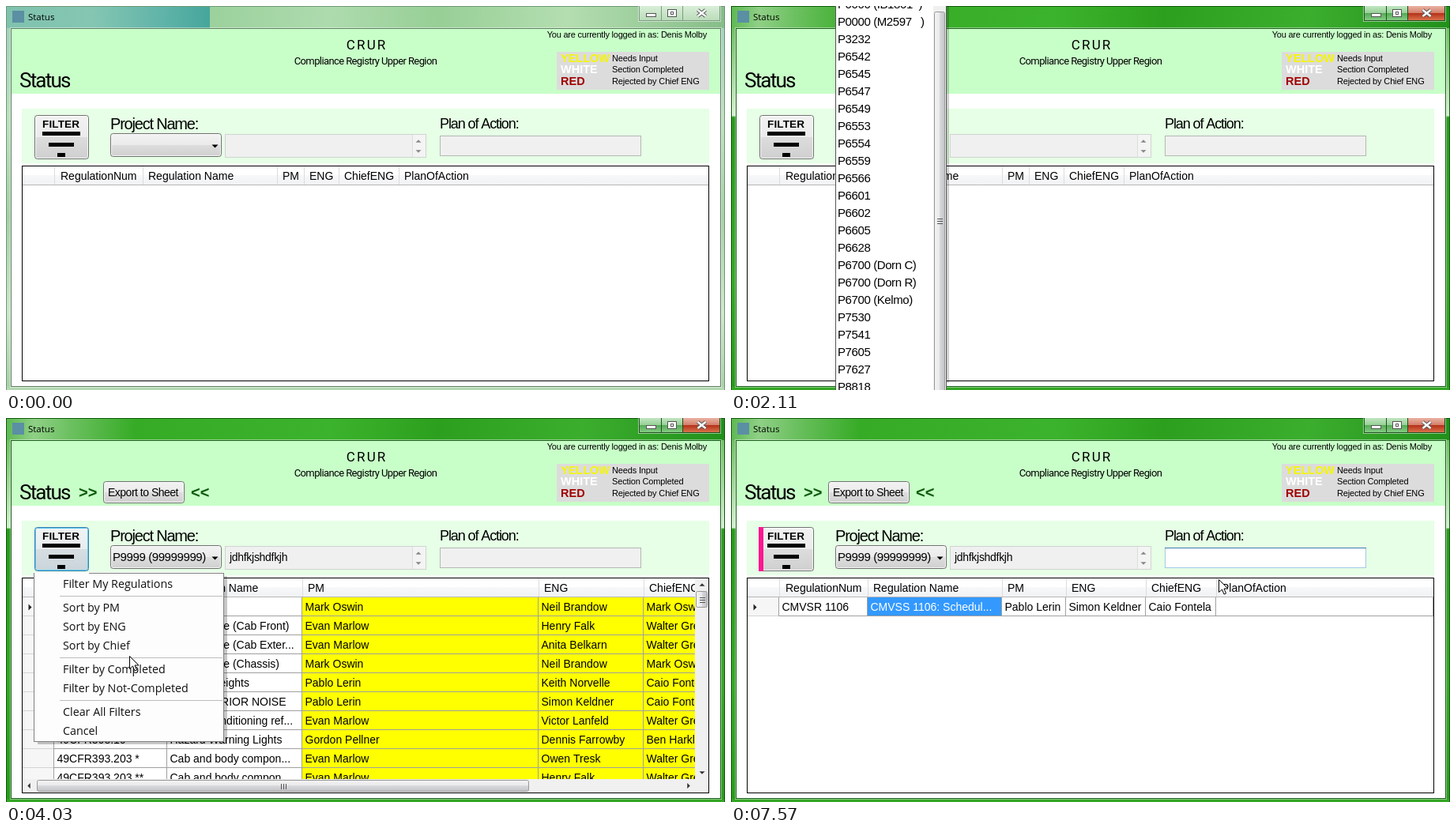
Write an HTML page with a canvas that moves like this. It is 910 px wide and 486 px high and loops after 8000 ms.

```html
<!DOCTYPE html>
<html lang="en">
<head>
<meta charset="utf-8">
<title>Status</title>
<style>
  html, body { margin: 0; width: 100%; height: 100%; overflow: hidden; }
  canvas { display: block; }
</style>
</head>
<body>
<canvas id="stage" width="910" height="486"></canvas>
<script>
const ctx = document.getElementById('stage').getContext('2d');
const LOOP = 8000;
const SANS = '"Liberation Sans", Arial, sans-serif';
const UI = '"Open Sans", sans-serif';
const TITLE = 'Roboto, sans-serif';
const BLUE = '#3399ff';

// ---------- drawing helpers ----------
function rect(x, y, w, h, fill) {
  ctx.fillStyle = fill;
  ctx.fillRect(x, y, w, h);
}

function outline(x, y, w, h, color) {
  ctx.strokeStyle = color;
  ctx.lineWidth = 1;
  ctx.strokeRect(x + .5, y + .5, w - 1, h - 1);
}

function gradient(x0, y0, x1, y1, stops) {
  const g = ctx.createLinearGradient(x0, y0, x1, y1);
  stops.forEach(([at, color]) => g.addColorStop(at, color));
  return g;
}

function poly(points, fill, stroke) {
  ctx.beginPath();
  points.forEach(([x, y]) => ctx.lineTo(x, y));
  ctx.closePath();
  ctx.fillStyle = fill;
  ctx.fill();
  if (stroke) {
    ctx.strokeStyle = stroke;
    ctx.lineWidth = 1;
    ctx.stroke();
  }
}

function text(str, x, cy, size, o = {}) {
  ctx.font = `${o.weight || 'normal'} ${size}px ${o.font || SANS}`;
  ctx.letterSpacing = (o.spacing || 0) + 'px';
  ctx.textAlign = o.align || 'left';
  ctx.fillStyle = o.color || '#000';
  ctx.fillText(str, x, Math.round(cy + size * .36));
}

function clipped(x, y, w, h, draw) {
  ctx.save();
  ctx.beginPath();
  ctx.rect(x, y, w, h);
  ctx.clip();
  draw();
  ctx.restore();
}

function arrow(x, y, r, dir, color = '#000') {
  const tri = { up: [[-r, r / 2], [r, r / 2], [0, -r / 2]], down: [[-r, -r / 2], [r, -r / 2], [0, r / 2]],
    left: [[r / 2, -r], [r / 2, r], [-r / 2, 0]], right: [[-r / 2, -r], [-r / 2, r], [r / 2, 0]] }[dir];
  poly(tri.map(([dx, dy]) => [x + dx, y + dy]), color);
}

function roundedLine(x, y, w, h, radius, color) {
  ctx.beginPath();
  ctx.roundRect(x + .5, y + .5, w - 1, h - 1, radius);
  ctx.strokeStyle = color;
  ctx.lineWidth = 1;
  ctx.stroke();
}

const BUTTON = {
  normal: ['#f2f2f2', '#ebebeb', '#dddddd', '#cfcfcf', '#707070'],
  focus: ['#f2f4f5', '#e8ecee', '#d8dee2', '#c8d4da', '#3c7fb1'],
  hover: ['#eaf6fd', '#d9f0fc', '#bee6fd', '#a7d9f5', '#3c7fb1'],
};

function button(x, y, w, h, state = 'normal') {
  const [a, b, c, d, edge] = BUTTON[state];
  rect(x + 1, y + 1, w - 2, h - 2, gradient(0, y, 0, y + h, [[0, a], [.5, b], [.5, c], [1, d]]));
  roundedLine(x + 1, y + 1, w - 2, h - 2, 2, state === 'focus' ? '#5cc8f0' : 'rgba(255,255,255,.8)');
  roundedLine(x, y, w, h, 3, edge);
}

function thumb(x, y, w, h, vertical) {
  const stops = [[0, '#f5f5f5'], [.5, '#e9e9eb'], [.5, '#d9dadc'], [1, '#c0c1c5']];
  rect(x + 1, y + 1, w - 2, h - 2, vertical ? gradient(x, 0, x + w, 0, stops) : gradient(0, y, 0, y + h, stops));
  roundedLine(x, y, w, h, 2, '#979797');
  const cx = Math.round(x + w / 2), cy = Math.round(y + h / 2);
  for (const k of [-3, 0, 3]) {
    if (vertical) rect(cx - 3, cy + k, 7, 1, '#555');
    else rect(cx + k, cy - 3, 1, 7, '#555');
  }
}

// ---------- window ----------
function chrome(active) {
  const top = active
    ? [[0, '#5cb850'], [.04, '#8fd086'], [.09, '#6cc060'], [.18, '#36ab26'], [.45, '#3cb32c'], [.6, '#2ca01e'], [.8, '#3cae2e'], [1, '#20901a']]
    : [[0, '#7fc2ae'], [.12, '#84c6b2'], [.22, '#5fb3a8'], [.283, '#46a69c'], [.284, '#9bd19c'], [.45, '#aedbae'], [.6, '#97cf96'], [.78, '#b4deb0'], [1, '#86bd88']];
  const side = active
    ? [[0, '#3cab2e'], [.06, '#6fc064'], [.285, '#d4efd0'], [.29, '#279a1b'], [.7, '#35a826'], [1, '#279a1b']]
    : [[0, '#9fcdb9'], [.3, '#bfe0c0'], [.55, '#a5d0a4'], [.8, '#cfe6cc'], [1, '#a9cfa6']];
  rect(0, 0, 910, 486, gradient(0, 0, 0, 486, side));
  rect(0, 0, 910, 28, gradient(0, 0, 910, active ? 60 : 0, top));
  rect(0, 482, 910, 4, active ? '#33a524' : '#b4d8b1');
  const rim = active ? '#155f10' : '#6f9a78';
  outline(0, 0, 910, 487, rim);
  outline(5, 27, 901, 456, 'rgba(255,255,255,.45)');
  outline(6, 28, 899, 454, active ? '#1d5f1d' : '#5f8064');

  rect(8, 6, 15, 15, '#5b8fa3');
  text('Status', 28, 14, 11.5, { font: UI });

  const edge = active ? '#1e4f1e' : '#7d9a83';
  const pale = active
    ? [[0, '#c2e6c2'], [.5, '#93cf93'], [.5, '#56ab56'], [1, '#8ad08a']]
    : [[0, '#d9eed8'], [1, '#b9dcb8']];
  const red = active ? [[0, '#eab3a4'], [.5, '#d27b65'], [.5, '#b5321b'], [1, '#dd7a50']] : pale;
  outline(800, -1, 105, 21, 'rgba(255,255,255,.5)');
  [[801, 29, pale], [829, 28, pale], [856, 48, red]].forEach(([x, w, stops]) => {
    rect(x, 0, w, 19, gradient(0, 0, 0, 19, stops));
    outline(x, -1, w, 20, edge);
  });
  rect(811, 10, 11, 4, '#fff');
  outline(810, 9, 13, 5, '#555');
  rect(838, 5, 10, 9, '#fff');
  outline(837, 4, 12, 10, '#555');
  outline(841, 7, 4, 4, '#555');
  for (const [width, color] of [[4.5, '#555'], [2.5, '#fff']]) {
    ctx.strokeStyle = color;
    ctx.lineWidth = width;
    ctx.beginPath();
    ctx.moveTo(875.5, 5); ctx.lineTo(885.5, 13);
    ctx.moveTo(885.5, 5); ctx.lineTo(875.5, 13);
    ctx.stroke();
  }
}

function header(loaded) {
  rect(7, 29, 897, 452, '#fff');
  rect(7, 29, 897, 82, '#c8ffc8');
  text('Status', 17, 94, 26, { font: TITLE, spacing: -1.8 });
  text('C R U R', 455, 49, 17, { font: TITLE, align: 'center', spacing: -1 });
  text('Compliance Registry Upper Region', 455, 69, 13, { font: TITLE, align: 'center', spacing: -.6 });
  text('You are currently logged in as: Denis Molby', 887, 36, 11, { align: 'right', spacing: -.22 });

  rect(697, 58, 193, 48, '#dcdcdc');
  [['YELLOW', '#f5f500', 'Needs Input', 66], ['WHITE', '#fff', 'Section Completed', 80], ['RED', '#a00000', 'Rejected by Chief ENG', 95]]
    .forEach(([name, color, meaning, y]) => {
      text(name, 702, y, 14.5, { weight: 'bold', color });
      text(meaning, 767, y, 11, { spacing: -.15 });
    });

  if (loaded) {
    text('>>', 92, 94, 20, { weight: 'bold', color: '#0b5a0b' });
    text('<<', 234, 94, 20, { weight: 'bold', color: '#0b5a0b' });
    button(123, 80, 103, 28);
    text('Export to Sheet', 129, 94, 14, { spacing: -.5 });
  }
}

function filterPanel({ loaded, buttonState, filtered, editing, caret }) {
  rect(20, 130, 870, 69, '#e6ffe6');
  button(36, 138, 69, 56, buttonState);
  if (filtered) rect(35, 138, 6, 56, '#ff1493');
  text('FILTER', 46, 149, 13.5, { weight: 'bold', spacing: .15 });
  rect(46, 159, 48, 5, '#000');
  rect(54, 173, 32, 5, '#000');
  rect(65, 186, 10, 5, '#000');

  text('Project Name:', 132, 149, 20, { spacing: -1.2 });
  button(132, 161, 141, 30);
  arrow(264.5, 177.5, 4, 'down');

  rect(277, 162, 255, 30, '#f0f0f0');
  outline(277, 162, 255, 30, '#d0d4d0');
  rect(514, 163, 17, 28, '#f4f4f4');
  rect(514, 163, 1, 28, '#dcdcdc');
  arrow(522, 171, 3.5, 'up', '#888');
  arrow(522, 184, 3.5, 'down', '#888');
  if (loaded) {
    clipped(133, 162, 121, 28, () => text('P9999 (99999999)', 135, 176, 15, { spacing: -.4 }));
    text('jdhfkjshdfkjh', 283, 176, 14, { spacing: -.3 });
  }

  text('Plan of Action:', 549, 149, 18, { spacing: -1.1 });
  rect(549, 164, 255, 26, editing ? '#fff' : '#f0f0f0');
  outline(549, 164, 255, 26, editing ? '#a4c9e3' : '#b4b8b4');
  if (editing) rect(549, 164, 255, 1, '#3d7bad');
  if (caret) rect(552, 167, 1, 20, '#000');
}

// ---------- grid ----------
const TITLES = ['RegulationNum', 'Regulation Name', 'PM', 'ENG', 'ChiefENG', 'PlanOfAction'];
const EMPTY_COLUMNS = [61, 173, 343, 377, 421, 497, 889];
const WIDE_COLUMNS = [61, 204, 375, 674, 807, 889];
const FITTED_COLUMNS = [61, 173, 343, 424, 525, 614, 889];

const [OSWIN, MARLO, LERIN, GRELL, FONTELA] = ['Mark Oswin', 'Evan Marlow', 'Pablo Lerin', 'Walter Grell', 'Caio Fontela'];
const ALL_ROWS = [
  ['CMVSR 1100', '', OSWIN, 'Neil Brandow', OSWIN],
  ['49CFR567.4', 'Safety Plate (Cab Front)', MARLO, 'Henry Falk', GRELL],
  ['49CFR567.5', 'Safety Plate (Cab Exter...', MARLO, 'Anita Belkarn', GRELL],
  ['49CFR567.7', 'Safety Plate (Chassis)', OSWIN, 'Neil Brandow', OSWIN],
  ['49CFR393.86', 'Bumper Heights', LERIN, 'Keith Norvelle', FONTELA],
  ['49CFR393.94', 'CAB INTERIOR NOISE', LERIN, 'Simon Keldner', FONTELA],
  ['40CFR86', 'Cab air conditioning ref...', MARLO, 'Victor Lanfeld', GRELL],
  ['49CFR393.19', 'Hazard Warning Lights', 'Gordon Pellner', 'Dennis Farrowby', 'Ben Harkley'],
  ['49CFR393.203 *', 'Cab and body compon...', MARLO, 'Owen Tresk', GRELL],
  ['49CFR393.203 **', 'Cab and body compon...', MARLO, 'Henry Falk', GRELL],
];
const FILTERED_ROWS = [['CMVSR 1106', 'CMVSS 1106: Schedul...', LERIN, 'Simon Keldner', FONTELA, '']];

function grid(columns, rows, selected, scrollbars) {
  rect(20, 202, 870, 273, '#fff');
  const right = scrollbars ? 872 : 889, bottom = scrollbars ? 457 : 474;
  clipped(21, 203, right - 21, bottom - 203, () => {
    rect(21, 203, 868, 23, gradient(0, 203, 0, 226, [[0, '#fff'], [.5, '#fff'], [.5, '#f7f8fa'], [1, '#f1f2f4']]));
    rect(21, 226, 868, 1, '#b8b8b8');
    columns.slice(0, -1).forEach((x, c) => {
      rect(x, 203, 1, 23, '#dcdcdc');
      text(TITLES[c], x + (c ? 7 : 8), 215, 14);
    });
    rows.forEach((row, r) => {
      const y = 227 + 24 * r;
      rect(21, y, 40, 23, '#f6f6f6');
      rect(21, y + 23, 40, 1, '#d4d4d4');
      row.forEach((cell, c) => {
        const x = columns[c], w = columns[c + 1] - x;
        const isSelected = r === 0 && c === selected;
        rect(x, y, w, 24, isSelected ? BLUE : scrollbars && c > 1 ? '#ffff00' : '#fff');
        rect(x, y + 23, w, 1, '#a0a0a0');
        rect(x + w - 1, y, 1, 24, '#a0a0a0');
        clipped(x, y, w - 1, 23, () => text(cell, x + 3.5, y + 12, 14, { color: isSelected ? '#fff' : '#000' }));
      });
      rect(60, y, 1, 24, '#a0a0a0');
    });
    if (rows.length) arrow(30.5, 239.5, 4, 'right', '#222');
  });
  if (scrollbars) {
    rect(872, 203, 17, 271, '#f0f0f0');
    rect(21, 457, 868, 17, '#f0f0f0');
    arrow(881, 211, 3.5, 'up', '#333');
    arrow(881, 449, 3.5, 'down', '#333');
    arrow(29, 465.5, 3.5, 'left', '#333');
    arrow(864, 465.5, 3.5, 'right', '#333');
    thumb(873, 219, 15, 21, true);
    thumb(39, 458, 623, 15, false);
  }
  outline(20, 202, 870, 273, '#000');
}

// ---------- popups ----------
const PROJECTS = ['',
  ...['55-00468 ', 'IB1707 ', 'IB1714  ', 'IB1720 ', 'IB1728  ', 'IB1734  ', 'IB1740  ', 'IB1746    ', 'IB1801  ', 'M2597   ']
    .map(code => `P0000 (${code})`),
  ...'P3232 P6542 P6545 P6547 P6549 P6553 P6554 P6559 P6566 P6601 P6602 P6605 P6628'.split(' '),
  'P6700 (Dorn C)', 'P6700 (Dorn R)', 'P6700 (Kelmo)',
  ...'P7530 P7541 P7605 P7627 P8818'.split(' ')];

function projectList(progress, hovered) {
  const scroll = Math.round(270 * progress);
  const top = Math.round(58 - 71 * progress);
  rect(273, top + 4, 3, 486, 'rgba(0,0,0,.18)');
  rect(132, top, 141, 500 - top, '#fff');
  clipped(133, top + 1, 123, 500, () => PROJECTS.forEach((name, i) => {
    const y = 59 + 22 * i - scroll;
    if (i === hovered) rect(133, y, 122, 22, BLUE);
    text(name, 135, y + 11, 15, { spacing: -.4, color: i === hovered ? '#fff' : '#000' });
  }));
  rect(256, top + 1, 16, 500, '#f0f0f0');
  arrow(264, top + 10, 3.5, 'up', '#333');
  thumb(257, top + 20, 14, 530, true);
  outline(132, top, 141, 600, '#555');
}

const MENU = [['Filter My Regulations', 210], ['Sort by PM', 240], ['Sort by ENG', 264], ['Sort by Chief', 288],
  ['Filter by Completed', 318], ['Filter by Not-Completed', 342], ['Clear All Filters', 372], ['Cancel', 396]];

function filterMenu(cursor) {
  rect(40, 200, 240, 213, 'rgba(0,0,0,.22)');
  rect(35, 195, 241, 215, '#fdfdfd');
  outline(35, 196, 241, 214, '#808080');
  rect(36, 195, 69, 2, '#fdfdfd');
  [225, 303, 357].forEach(y => rect(68, y, 206, 1, '#bdbdbd'));
  MENU.forEach(([label, y]) => {
    if (Math.abs(cursor.y - y) < 12) {
      rect(37, y - 12, 237, 23, '#c4e1ff');
      outline(37, y - 12, 237, 23, BLUE);
    }
    text(label, 72, y, 14.3, { font: UI, color: '#111' });
  });
}

// ---------- pointer ----------
const PATH = [[150, 360, 330], [480, 263, 176], [700, 263, 176], [900, 244, 169], [1020, 244, 169],
  [1800, 225, 366], [1890, 222, 395], [2110, 215, 490], [2640, 190, 470], [2940, 90, 181], [3650, 90, 181],
  [4030, 156, 301], [4260, 166, 317], [4730, 166, 317], [5040, 166, 292], [5520, 196, 241],
  [5600, 196, 242], [5760, 195, 241], [5990, 195, 241], [6790, 616, 205], [6890, 617, 204], [LOOP, 617, 204]];

function pointerAt(t) {
  const i = PATH.findIndex(p => p[0] > t);
  if (i < 1) return null;
  const [t0, x0, y0] = PATH[i - 1], [t1, x1, y1] = PATH[i];
  const k = (t - t0) / (t1 - t0);
  return { x: Math.round(x0 + (x1 - x0) * k), y: Math.round(y0 + (y1 - y0) * k) };
}

const ARROW = [[0, 0], [0, 16], [4, 12.5], [6.5, 18.5], [9, 17.5], [6.5, 11.5], [11.5, 11.5]];
const HAND = [[-1.5, 1], [0, 0], [1.5, 1], [1.5, 7], [5, 7], [10, 9], [10, 15], [8, 21], [-1, 21], [-6, 13], [-5, 11], [-1.5, 14]];

function pointer({ x, y }, hand) {
  poly((hand ? HAND : ARROW).map(([dx, dy]) => [x + dx + .5, y + dy + .5]), '#fff', '#000');
}

// ---------- timeline ----------
function draw(t) {
  const between = (a, b) => t >= a && t < b;
  const cursor = pointerAt(t);
  const loaded = t >= 2640, filtered = t >= 4730, menuOpen = between(3340, 4510);
  const overFilter = between(2800, 3700) && cursor.x < 106 && cursor.y < 195;
  const buttonState = overFilter ? 'hover' : between(3340, 4730) ? 'focus' : 'normal';

  chrome(t >= 480);
  header(loaded);
  filterPanel({ loaded, buttonState, filtered, editing: t >= 5990, caret: between(7030, 7570) });

  if (filtered) grid(FITTED_COLUMNS, FILTERED_ROWS, t >= 5990 ? 1 : 0, false);
  else if (loaded) grid(WIDE_COLUMNS, ALL_ROWS, 0, true);
  else grid(EMPTY_COLUMNS, [], -1, false);

  if (between(560, 2640)) {
    const progress = Math.min(1, Math.max(0, (t - 1020) / 780));
    const hovered = t < 1020 ? 0 : t < 2110 ? Math.floor((cursor.y - 59 + 270 * progress) / 22) : -1;
    projectList(progress, hovered);
  }
  if (menuOpen) filterMenu(cursor);
  if (cursor && !between(2110, 2640)) pointer(cursor, overFilter);
}

function tick(now) {
  draw(now % LOOP);
  requestAnimationFrame(tick);
}
requestAnimationFrame(tick);
</script>
</body>
</html>
```
